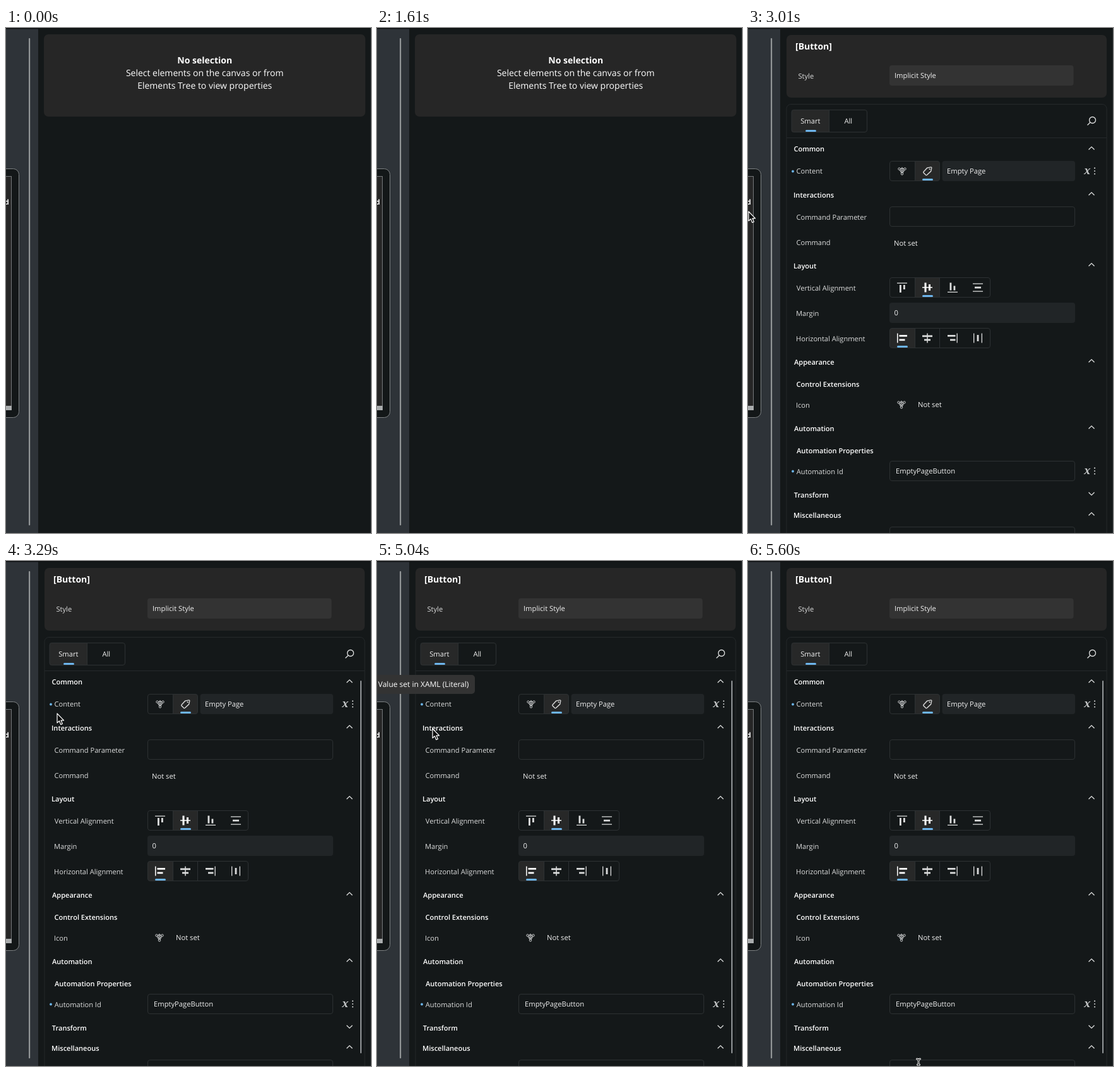
These frames come from a looping animation (578 by 798 pixels, 5.67 s). An HTML page:

```html
<!DOCTYPE html>
<html lang="en">
<head>
<meta charset="utf-8">
<title>Property panel</title>
<style>
  html, body { margin: 0; width: 100%; height: 100%; overflow: hidden; background: #141819; }
  svg { display: block; width: 578px; height: 798px; }
  text { font-family: "Open Sans", "Noto Sans", sans-serif; font-size: 11.1px; fill: #dcdddd; text-rendering: geometricPrecision; }
  .value { font-size: 11.2px; fill: #f0f0f0; }
  .head { font-size: 11.05px; font-weight: 600; fill: #fff; }
  .title { font-size: 14px; font-weight: 700; fill: #fff; }
  .lead { font-size: 14px; fill: #fff; }
  .mid { text-anchor: middle; }
  .bind text { font: italic 700 17px "Noto Serif", "Liberation Serif", serif; fill: #c4c6c7; }
  .box { fill: none; stroke: #2d3133; }
  .fill { fill: #212527; }
  .on { fill: #272828; }
  .card { fill: #262626; }
  .blue { fill: #6db5ec; }
  .line { fill: none; stroke: #dfe0e0; stroke-width: 1.3; }
  .thin { fill: none; stroke: #d6d7d8; stroke-width: 1; }
  .bars { fill: #dcdddd; }
  .bar { fill: #929698; }

  /* The picture advances on a 70 ms grid: 81 ticks per loop. */
  .anim { animation: 5.67s step-end infinite; }
  #empty { animation-name: empty; }
  #props { animation-name: props; }
  #scroll { animation-name: scroll; }
  #tip { animation-name: tip; }
  #hover { animation-name: hover; }
  #arrow { animation-name: arrow; }
  #beam { animation-name: beam; }

  @keyframes empty { 0% { opacity: 1 } 38.271%, 100% { opacity: 0 } }
  @keyframes props { 0% { opacity: 0 } 38.271%, 100% { opacity: 1 } }
  @keyframes scroll { 0% { opacity: 0 } 56.79%, 100% { opacity: 1 } }
  @keyframes tip { 0% { opacity: 0 } 69.135% { opacity: 1 } 90.123%, 100% { opacity: 0 } }
  @keyframes hover { 0% { opacity: 0 } 92.592% { opacity: 1 } 96.296%, 100% { opacity: 0 } }
  @keyframes arrow {
    0% { opacity: 0; transform: translate(175px, 762px) }
    1.234% { opacity: 1; transform: translate(175px, 762px) }
    2.469% { opacity: 0; transform: translate(1px, 290px) }
    53.086% { opacity: 1; transform: translate(1px, 290px); animation-timing-function: steps(2) }
    55.555% { opacity: 1; transform: translate(50px, 258px); animation-timing-function: steps(2) }
    58.024% { opacity: 1; transform: translate(81px, 241px); animation-timing-function: steps(4) }
    62.962% { opacity: 1; transform: translate(77px, 233px); animation-timing-function: steps(4) }
    67.901% { opacity: 1; transform: translate(75px, 231px) }
    71.604% { opacity: 1; transform: translate(75px, 230px) }
    88.888% { opacity: 1; transform: translate(88px, 265px); animation-timing-function: steps(3) }
    92.592% { opacity: 0; transform: translate(262px, 700px) }
    96.296% { opacity: 1; transform: translate(265px, 735px) }
    97.53% { opacity: 1; transform: translate(268px, 766px) }
    98.765%, 100% { opacity: 0; transform: translate(270px, 792px) }
  }
  @keyframes beam {
    0% { opacity: 0; transform: translate(263px, 702px) }
    92.592% { opacity: 1; transform: translate(263px, 702px) }
    96.296% { opacity: 0; transform: translate(270px, 794px) }
    98.765%, 100% { opacity: 1; transform: translate(270px, 794px) }
  }
</style>
</head>
<body>
<svg viewBox="0 0 578 798">
  <defs>
    <path id="up" class="line" d="M-4.5 2.2 0-2.2 4.5 2.2"/>
    <path id="down" class="line" d="M-4.5-2.2 0 2.2 4.5-2.2"/>
    <g id="net" class="thin">
      <path d="M-3-3.4H3M-4-1.7-1.1 3M4-1.7 1.1 3M-3.1-2.4-1.2-.6M3.1-2.4 1.2-.6M0 1.4V3"/>
      <circle cx="-4.5" cy="-3.4" r="1.7"/>
      <circle cx="4.5" cy="-3.4" r="1.7"/>
      <circle cy="4.4" r="1.7"/>
      <circle r="1.4"/>
      <circle cy="-4.2" r="1.2"/>
    </g>
    <g id="bind" class="bind">
      <text x="-6" y="4.5">x</text>
      <g fill="#c4c6c7">
        <circle cx="11" cy="-4.6" r="1.1"/><circle cx="11" r="1.1"/><circle cx="11" cy="4.6" r="1.1"/>
      </g>
    </g>
    <rect id="field" class="box" x="224.5" width="293" height="31" rx="3.5"/>
    <path id="cells" class="box" d="M228 .5H380a3.500 3.500 0 0 1 3.500 3.500V28a3.500 3.500 0 0 1-3.500 3.500H228a3.500 3.500 0 0 1-3.500-3.500V4a3.500 3.500 0 0 1 3.500-3.500ZM264.500 .5V31.500M303.500 .5V31.500"/>
    <rect id="mark" class="blue" x="-8.500" width="17" height="3" rx="1.500"/>
  </defs>

  <rect width="578" height="798" fill="#141819"/>

  <!-- canvas strip with device edge -->
  <rect width="51" height="798" fill="#2e3338"/>
  <rect x="-20" y="222.500" width="40.500" height="393" rx="9" fill="#131718" stroke="#7d8183"/>
  <rect x="-20" y="234.500" width="28.500" height="369" fill="#262626" stroke="#75797b"/>
  <rect y="597" width="9" height="7" fill="#a9acad"/>
  <text x="4.700" y="279" text-anchor="end" style="font-weight:700;fill:#fff">d</text>
  <rect class="bar" x="36" y="16" width="2.200" height="770" rx="1.100"/>
  <rect width="578" height="1.500" fill="#0c0f10"/>
  <rect x="577" width="1" height="798" fill="#202527"/>

  <g id="empty" class="anim">
    <rect class="card" x="60" y="10" width="509" height="130" rx="7"/>
    <text class="title mid" x="314.700" y="56">No selection</text>
    <text class="lead mid" x="314.700" y="76.300">Select elements on the canvas or from</text>
    <text class="lead mid" x="314.700" y="96.300">Elements Tree to view properties</text>
  </g>

  <g id="props" class="anim">
    <rect class="card" x="61" y="11" width="507" height="99" rx="7"/>
    <text class="title" x="75" y="33.500">[Button]</text>
    <text x="79.500" y="79.500">Style</text>
    <rect x="224" y="59" width="291.500" height="32" rx="4" fill="#333"/>
    <text class="value" x="232" y="79">Implicit Style</text>

    <rect class="box" x="61" y="120.500" width="507" height="700" rx="7" style="stroke:#25292b"/>
    <path d="M61 173.500H568" stroke="#25292b"/>
    <rect class="on" x="69" y="129" width="59.500" height="36" rx="3.500"/>
    <rect class="box" x="69" y="129.500" width="119.500" height="35" rx="3.500"/>
    <path class="box" d="M128.500 130V164"/>
    <text class="value mid" x="98.800" y="151">Smart</text>
    <text class="value mid" x="158.800" y="151">All</text>
    <use href="#mark" x="99.500" y="161"/>
    <g class="line"><circle cx="545.500" cy="145.500" r="5"/><path d="M541.800 149.200 537.500 153.500"/></g>

    <text class="head" x="72.500" y="195.300">Common</text>
    <use href="#up" x="544" y="190"/>
    <circle class="blue" cx="71" cy="226.500" r="1.900"/>
    <text x="76.500" y="230.300">Content</text>
    <rect class="on" x="264.500" y="210.500" width="39" height="31" rx="3"/>
    <rect class="box" x="224.500" y="210.500" width="79" height="31" rx="3.500"/>
    <path class="box" d="M264.500 211V241"/>
    <use href="#net" x="244" y="226"/>
    <path class="line" d="M278 227.200 283.600 221.200 289.600 219.800Q291 219.800 290.800 221.200L289.700 226.300 283.400 232.300Q282.400 233 281.500 232.300L278 228.800Q277.400 228 278 227.200Z"/>
    <circle cx="287.700" cy="223" r="1" fill="#dfe0e0"/>
    <use href="#mark" x="284.500" y="238"/>
    <rect class="fill" x="307.500" y="210" width="210.500" height="32" rx="4"/>
    <text class="value" x="315" y="230">Empty Page</text>
    <use href="#bind" x="538" y="226"/>

    <text class="head" x="72" y="267.500">Interactions</text>
    <use href="#up" x="544" y="262"/>
    <text x="76.500" y="302.500">Command Parameter</text>
    <use href="#field" y="282.500"/>
    <text x="76.500" y="342.500">Command</text>
    <text class="value" x="231" y="343.500">Not set</text>

    <text class="head" x="72" y="379.500">Layout</text>
    <use href="#up" x="544" y="374"/>
    <text x="76.800" y="414.500">Vertical Alignment</text>
    <rect class="on" x="264.500" y="394.500" width="39" height="31"/>
    <use href="#cells" y="394"/>
    <path class="bars" d="M236 402.500h16v1.300h-16zM240 406h2.800v12h-2.800zM246 406h2.800v7h-2.800z"/>
    <path class="bars" style="fill:#fff" d="M276 409.300h16v1.500h-16zM279.500 402.500h3v15h-3zM286 405h3v10h-3z"/>
    <path class="bars" d="M316 416.700h16v1.300h-16zM319.500 402.500h2.800v12h-2.800zM325.500 407.500h2.800v7h-2.800z"/>
    <path class="bars" d="M356 403.500h16v1.300h-16zM359 408.800h10v2.800h-10zM356 415.500h16v1.300h-16z"/>
    <use href="#mark" x="284.500" y="422"/>
    <text x="76" y="454.500">Margin</text>
    <rect class="fill" x="224" y="434" width="294" height="32" rx="4"/>
    <text class="value" x="231.500" y="454.300">0</text>
    <text x="76" y="494.500">Horizontal Alignment</text>
    <rect class="on" x="224.500" y="474.500" width="40" height="31" rx="3"/>
    <use href="#cells" y="474"/>
    <path class="bars" style="fill:#fff" d="M236 482.500h1.500v15h-1.500zM239.500 485h12.500v2.800h-12.500zM239.500 491.500h9v2.800h-9z"/>
    <path class="bars" d="M283.300 482.500h1.500v15h-1.500zM276 485.500h16v2.800h-16zM279 491.500h10v2.800h-10z"/>
    <path class="bars" d="M330.500 482.500h1.300v15h-1.300zM316 485h12.500v2.800h-12.500zM320 491.500h8.500v2.800h-8.500z"/>
    <path class="bars" d="M357 482.500h1.300v15h-1.300zM362.600 485h2.800v10h-2.800zM369.700 482.500h1.300v15h-1.300z"/>
    <use href="#mark" x="244.500" y="502"/>

    <text class="head" x="73" y="531.500">Appearance</text>
    <use href="#up" x="544" y="526"/>
    <text class="head" x="76.500" y="567">Control Extensions</text>
    <text x="76" y="599.500">Icon</text>
    <use href="#net" x="243" y="595"/>
    <text class="value" x="269" y="598.500">Not set</text>

    <text class="head" x="73" y="636.500">Automation</text>
    <use href="#up" x="544" y="631"/>
    <text class="head" x="77" y="672">Automation Properties</text>
    <circle class="blue" cx="71" cy="700.500" r="1.900"/>
    <text x="76.800" y="704.500">Automation Id</text>
    <use href="#field" y="684.500"/>
    <text class="value" x="234" y="704">EmptyPageButton</text>
    <use href="#bind" x="538" y="700"/>
    <text class="head" x="72.800" y="741.500">Transform</text>
    <use href="#down" x="544" y="736"/>
    <text class="head" x="72" y="773.500">Miscellaneous</text>
    <use href="#up" x="544" y="768"/>
    <use href="#field" y="788.500"/>
  </g>

  <rect id="hover" class="anim" x="224.500" y="685" width="293" height="30.500" rx="3.500" fill="none" stroke="#4b5053"/>
  <rect id="scroll" class="anim bar" x="561" y="189" width="2" height="589" rx="1"/>

  <g id="tip" class="anim">
    <rect x="-10" y="180" width="165" height="30" rx="5" fill="#333"/>
    <text x="1.800" y="199.300" style="font-size:12px;fill:#fff">Value set in XAML (Literal)</text>
  </g>

  <g id="arrow" class="anim">
    <path d="M0 0V14.800L3.400 11.700 5.800 17.400 8.400 16.300 6 10.800H10.600Z" fill="#0b0c0c" stroke="#fff" stroke-width="1.200" stroke-linejoin="round"/>
  </g>
  <g id="beam" class="anim" fill="none" stroke-linecap="round">
    <path id="stem" d="M-2.500-7Q0-7 0-5 0-7 2.500-7M0-5V5M-2.500 7Q0 7 0 5 0 7 2.500 7M-1.500 2H1.500" stroke="#fff" stroke-width="2.800"/>
    <use href="#stem" style="display:none"/>
    <path d="M-2.500-7Q0-7 0-5 0-7 2.500-7M0-5V5M-2.500 7Q0 7 0 5 0 7 2.500 7M-1.500 2H1.500" stroke="#0b0c0c" stroke-width="1"/>
  </g>
</svg>
</body>
</html>
```
